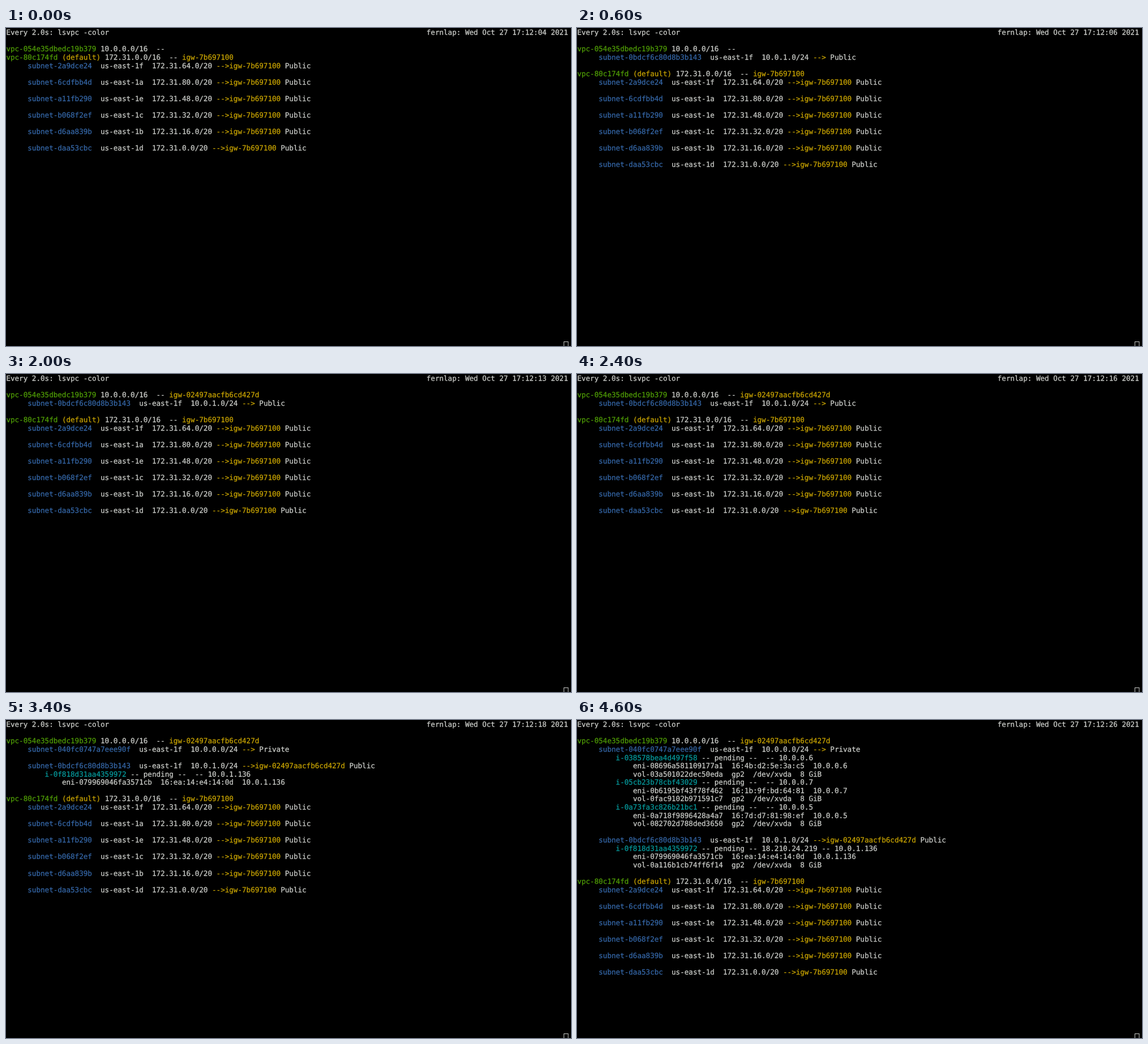
These frames come from a looping animation (998x561 px, 5000 ms). An HTML page with a canvas:

```html
<!DOCTYPE html>
<html lang="en">
<head>
<meta charset="utf-8">
<title>lsvpc watch</title>
<style>
  html, body { margin: 0; width: 100%; height: 100%; overflow: hidden; background: #000; }
  canvas { display: block; }
</style>
</head>
<body>
<canvas id="screen" width="998" height="561"></canvas>
<script>
const ctx = document.getElementById('screen').getContext('2d');
const LOOP = 5000, COLUMN = 7.575, ROW = 14.57, LEFT = 0.4, BASELINE = 12.3;
const WHITE = '#c8cac6', GREEN = '#4e9a06', YELLOW = '#c4a000', BLUE = '#3465a4', CYAN = '#06989a';
const PREFIX_COLORS = [
  ['vpc-', GREEN], ['(default)', YELLOW], ['-->', YELLOW], ['igw-', YELLOW],
  ['subnet-', BLUE], ['i-', CYAN],
];

const subnet = (id, zone, cidr, route) => `     subnet-${id}  us-east-1${zone}  ${cidr} -->${route}`;
const instance = (id, publicIp, ip) => `         i-${id} -- pending -- ${publicIp} -- ${ip}`;
const eni = (id, mac, ip) => `             eni-${id}  ${mac}  ${ip}`;
const volume = id => `             vol-${id}  gp2  /dev/xvda  8 GiB`;

const GATEWAY = 'igw-02497aacfb6cd427d', DEFAULT_GATEWAY = 'igw-7b697100';
const mainVpc = gateway => `vpc-054e35dbedc19b379 10.0.0.0/16  -- ${gateway}`;
const privateSubnet = subnet('040fc0747a7eee90f', 'f', '10.0.0.0/24', ' Private');
const publicSubnet = gateway => subnet('0bdcf6c80d8b3b143', 'f', '10.0.1.0/24', gateway + ' Public');
const publicInstance = ip => [
  instance('0f818d31aa4359972', ip, '10.0.1.136'),
  eni('079969046fa3571cb', '16:ea:14:e4:14:0d', '10.0.1.136'),
];
const privateInstance = (id, eniId, mac, volumeId, ip) =>
  [instance(id, '', ip), eni(eniId, mac, ip), volume(volumeId)];

const defaultVpc = [
  `vpc-80c174fd (default) 172.31.0.0/16  -- ${DEFAULT_GATEWAY}`,
  ...[
    ['2a9dce24', 'f', 64], ['6cdfbb4d', 'a', 80], ['a11fb290', 'e', 48],
    ['b068f2ef', 'c', 32], ['d6aa839b', 'b', 16], ['daa53cbc', 'd', 0],
  ].flatMap(([id, zone, block]) =>
    [subnet(id, zone, `172.31.${block}.0/20`, DEFAULT_GATEWAY + ' Public'), '']),
];

const empty = [mainVpc('')];
const withSubnet = [mainVpc(''), publicSubnet(''), ''];
const withGateway = [mainVpc(GATEWAY), publicSubnet(''), ''];
const launching = [
  mainVpc(GATEWAY), privateSubnet, '',
  publicSubnet(GATEWAY), ...publicInstance(''), '',
];
const launched = [
  mainVpc(GATEWAY), privateSubnet,
  ...privateInstance('038578bea4d497f58', '08696a581109177a1', '16:4b:d2:5e:3a:c5', '03a501022dec50eda', '10.0.0.6'),
  ...privateInstance('05cb23b78cbf43029', '0b6195bf43f78f462', '16:1b:9f:bd:64:81', '0fac9102b971591c7', '10.0.0.7'),
  ...privateInstance('0a73fa3c826b21bc1', '0a718f9896428a4a7', '16:7d:d7:81:98:ef', '082702d788ded3650', '10.0.0.5'),
  '',
  publicSubnet(GATEWAY), ...publicInstance('18.210.24.219'), volume('0a116b1cb74ff6f14'), '',
];

// Each refresh: start in ms, seconds on the clock, listing of the main VPC
const refreshes = [
  [0, '04', empty], [600, '06', withSubnet], [1000, '09', withGateway],
  [1400, '11', withGateway], [2000, '13', withGateway], [2400, '16', withGateway],
  [3000, '18', launching], [3600, '20', launched], [4200, '23', launched], [4600, '26', launched],
];

function drawLine(line, row) {
  for (const { 0: word, index } of line.matchAll(/\S+/g)) {
    const match = PREFIX_COLORS.find(([prefix]) => word.startsWith(prefix));
    ctx.fillStyle = ctx.strokeStyle = match ? match[1] : WHITE;
    const x = LEFT + index * COLUMN, y = BASELINE + row * ROW;
    ctx.fillText(word, x, y);
    ctx.strokeText(word, x, y);
  }
}

function draw([, seconds, listing]) {
  ctx.fillStyle = '#000';
  ctx.fillRect(0, 0, 998, 561);
  ctx.font = '12.58px "DejaVu Sans Mono", monospace';
  ctx.textRendering = 'geometricPrecision';
  ctx.lineWidth = 0.3;
  const title = 'Every 2.0s: lsvpc -color';
  const clock = `fernlap: Wed Oct 27 17:12:${seconds} 2021`;
  [title.padEnd(98) + clock, '', ...listing, ...defaultVpc].forEach(drawLine);
  // Hollow cursor, cut off by the bottom edge
  ctx.strokeStyle = WHITE;
  ctx.lineWidth = 1;
  ctx.strokeRect(985.5, 553.5, 7.5, 14);
}

function tick() {
  const time = performance.now() % LOOP;
  draw(refreshes.findLast(([start]) => start <= time));
  requestAnimationFrame(tick);
}
tick();
</script>
</body>
</html>
```
